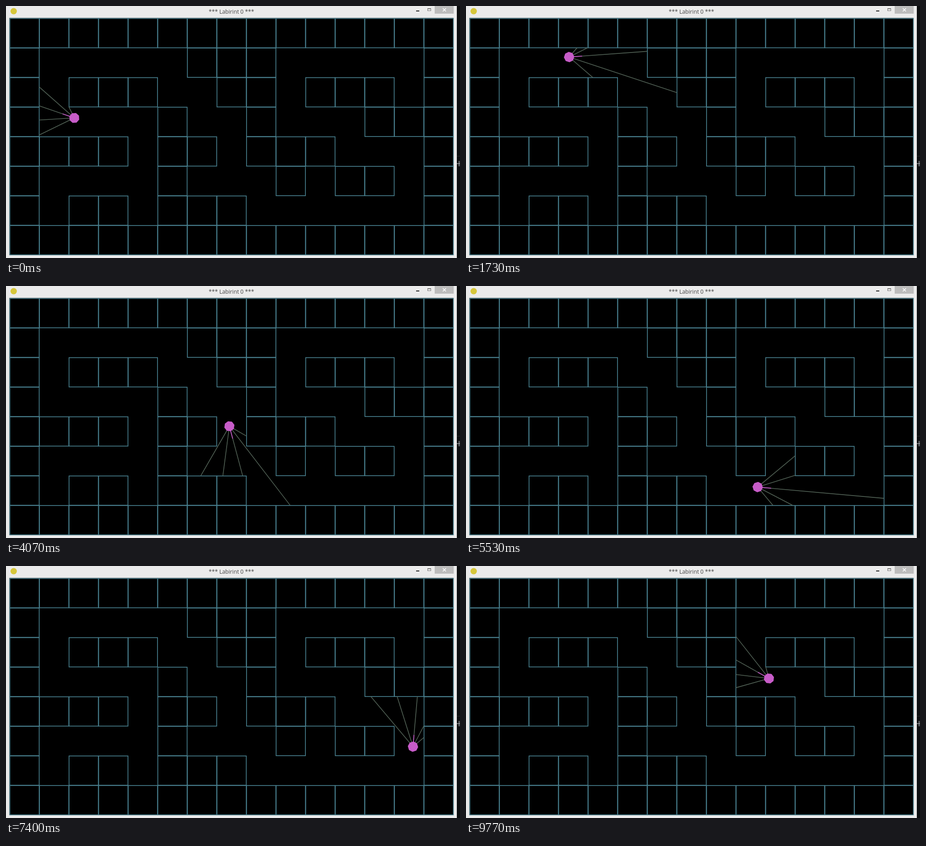
Recreate the animation shown at these times as an HTML page with a canvas. Size 1004 by 558 pixels, loop 9.81 s.

```html
<!DOCTYPE html>
<html lang="en">
<head>
<meta charset="utf-8">
<title>Labirint</title>
<style>
html, body { margin: 0; width: 100%; height: 100%; overflow: hidden; background: #ebebeb; }
canvas { display: block; }
</style>
</head>
<body>
<canvas id="stage" width="1004" height="558"></canvas>
<script>
const ctx = document.getElementById("stage").getContext("2d");
const LOOP = 9810;
const LEFT = 8, TOP = 27, CELL_W = 65.42, CELL_H = 65.5;
const MAZE = [
  "###############",
  "#.....###.....#",
  "#.###..##.###.#",
  "#....#..#...###",
  "####.##.###...#",
  "#....#...#.##.#",
  "#.##.###......#",
  "###############"
];

// Key poses of the drive: time in ms, x, y, heading in degrees
const POSES = [
  [0, 151, 247.8, 199],
  [640, 94, 190, -92],
  [1730, 228, 113, -4.2],
  [3060, 416, 192, 45],
  [4070, 494, 310.5, 75],
  [4800, 538, 405, 50],
  [5530, 645, 445.2, 5.1],
  [6530, 810, 456, 0.3],
  [7400, 900, 400, -85],
  [8270, 853, 333.2, -150.2],
  [9770, 670, 249, -150.7]
].map(([t, x, y, deg]) => ({ t, x, y, angle: deg * Math.PI / 180 }));

// Speed at each pose: mean of the two neighbouring legs
const LAST = POSES.length - 1;
const legSpeed = i => {
  const a = POSES[i], b = POSES[i + 1];
  return 1.05 * Math.hypot(b.x - a.x, b.y - a.y) / (b.t - a.t);
};
POSES.forEach((p, i) => {
  const speed = (legSpeed(Math.max(0, i - 1)) + legSpeed(Math.min(LAST - 1, i))) / 2;
  p.vx = speed * Math.cos(p.angle);
  p.vy = speed * Math.sin(p.angle);
});

function hermite(p0, v0, p1, v1, u, span) {
  const u2 = u * u, u3 = u2 * u;
  const m0 = v0 * span, m1 = v1 * span;
  return {
    value: (2 * u3 - 3 * u2 + 1) * p0 + (u3 - 2 * u2 + u) * m0
         + (3 * u2 - 2 * u3) * p1 + (u3 - u2) * m1,
    slope: ((6 * u2 - 6 * u) * (p0 - p1) + (3 * u2 - 4 * u + 1) * m0
         + (3 * u2 - 2 * u) * m1) / span
  };
}

function robotAt(time) {
  const t = Math.min(time, POSES[LAST].t);
  let i = 0;
  while (i < LAST - 1 && POSES[i + 1].t <= t) i++;
  const a = POSES[i], b = POSES[i + 1], span = b.t - a.t;
  const u = (t - a.t) / span;
  const x = hermite(a.x, a.vx, b.x, b.vx, u, span);
  const y = hermite(a.y, a.vy, b.y, b.vy, u, span);
  return {
    x: x.value, y: y.value,
    angle: Math.atan2(y.slope, x.slope),
    speed: Math.hypot(x.slope, y.slope)
  };
}

function isWall(x, y) {
  const row = MAZE[Math.floor((y - TOP) / CELL_H)];
  return !row || row[Math.floor((x - LEFT) / CELL_W)] !== ".";
}

function line(x0, y0, x1, y1, color, width) {
  ctx.strokeStyle = color;
  ctx.lineWidth = width;
  ctx.beginPath();
  ctx.moveTo(x0, y0);
  ctx.lineTo(x1, y1);
  ctx.stroke();
}

function box(x, y, w, h, color) {
  ctx.fillStyle = color;
  ctx.fillRect(x, y, w, h);
}

function drawWindow() {
  box(0, 0, 1004, 558, "#ebebeb");
  box(997, 0, 7, 558, "#0c0e10");
  box(997, 332, 7, 1, "#2a2c2e");
  line(997, 349, 1004, 349, "#9a9fa4", 1.5);
  line(1002, 343, 1002, 355, "#9a9fa4", 1.5);

  ctx.fillStyle = "#d6c63a";
  ctx.beginPath();
  ctx.arc(17, 11.5, 7, 0, 7);
  ctx.fill();

  ctx.fillStyle = "#444";
  ctx.font = '12.2px "Open Sans", "Noto Sans", sans-serif';
  ctx.textAlign = "center";
  ctx.fillText("*** Labirint 0 ***", 498.5, 17);

  box(907, 10, 7, 2, "#222");
  ctx.strokeStyle = "#777";
  ctx.lineWidth = 1;
  ctx.strokeRect(932.5, 5.5, 7, 5);
  box(932, 5, 8, 2, "#777");
  box(948, 0, 42, 17, "#bcbcbc");
  line(966, 5, 973, 12, "#fff", 1.6);
  line(973, 5, 966, 12, "#fff", 1.6);
  box(7.5, 26.5, 982, 525, "#000");
}

function drawMaze() {
  ctx.strokeStyle = "#487f8e";
  ctx.lineWidth = 1.7;
  MAZE.forEach((row, r) => [...row].forEach((cell, c) => {
    if (cell === "#") {
      ctx.strokeRect(LEFT + c * CELL_W + 0.6, TOP + r * CELL_H + 0.6, CELL_W - 0.6, CELL_H - 0.6);
    }
  }));
}

function drawRay(robot, angle) {
  const dx = Math.cos(angle) * 0.25, dy = Math.sin(angle) * 0.25;
  let { x, y } = robot;
  while (!isWall(x, y)) {
    x += dx;
    y += dy;
  }
  line(robot.x, robot.y, x, y, "#526256", 1.6);
}

function drawRobot(robot) {
  const { x, y, angle, speed } = robot;
  for (let k = -2; k <= 2; k++) drawRay(robot, angle + k * Math.PI / 8);
  const reach = 18 + speed * 70;
  line(x, y, x + reach * Math.cos(angle), y + reach * Math.sin(angle), "#b455b8", 2);
  ctx.fillStyle = "#c75cc8";
  ctx.beginPath();
  for (let k = 0; k < 8; k++) {
    const a = angle + k * Math.PI / 4;
    ctx.lineTo(x + 11.5 * Math.cos(a), y + 11.5 * Math.sin(a));
  }
  ctx.fill();
}

const start = performance.now();

function draw() {
  const t = (performance.now() - start) % LOOP;
  const step = Math.floor((t + 3.4) * 0.03); // 30 poses per second
  drawWindow();
  drawMaze();
  drawRobot(robotAt(Math.round(step / 0.3) * 10));
  requestAnimationFrame(draw);
}
draw();
</script>
</body>
</html>
```
